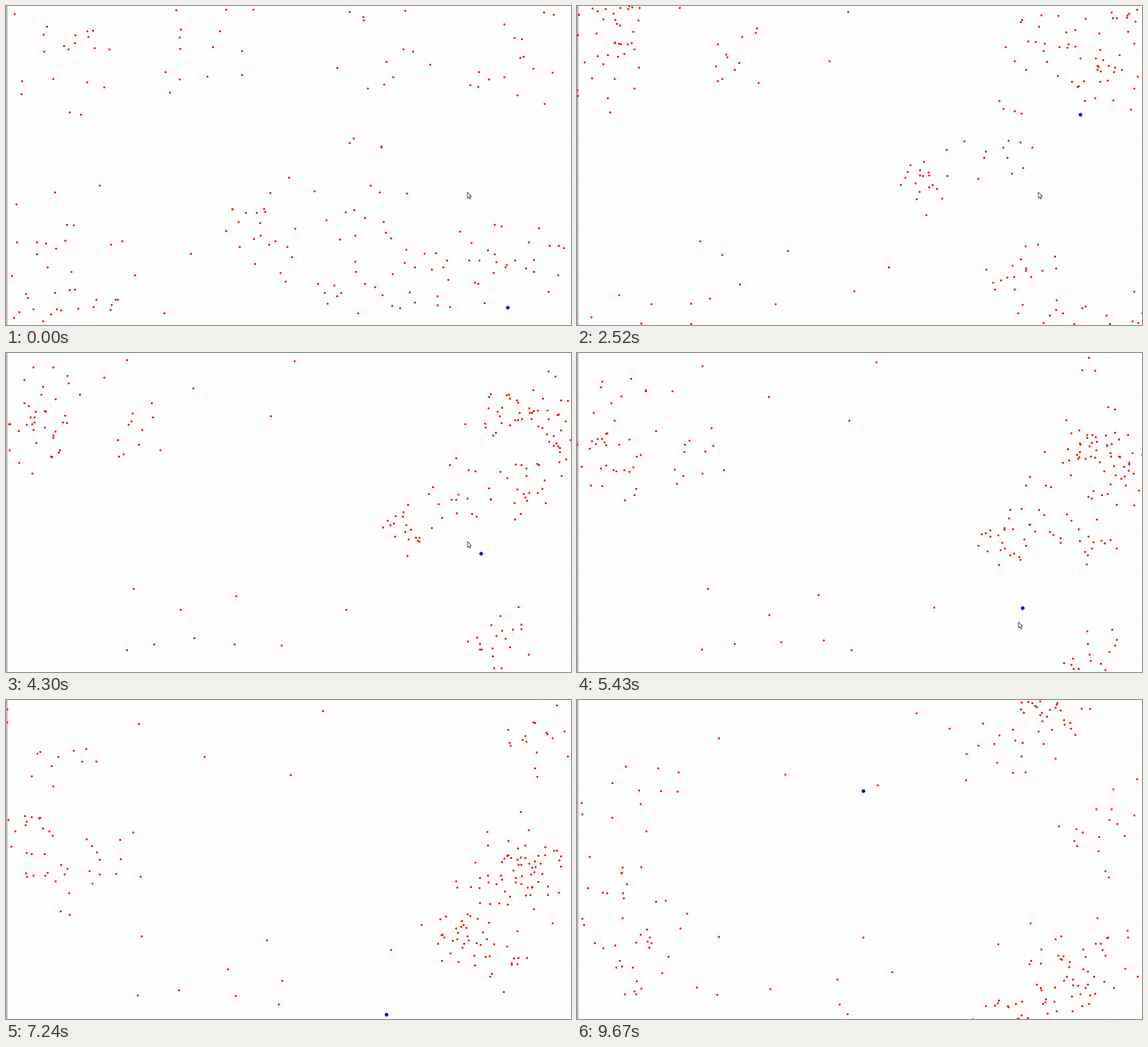
These frames come from a looping animation (997 px wide and 562 px high, 9770 ms). A matplotlib script:

```python
import numpy as np
import matplotlib.pyplot as plt
from matplotlib.animation import FuncAnimation
from matplotlib.patches import Polygon

W, H, DPI = 997, 562, 64
LOOP, FRAMES = 9770, 123
PX = 72 / DPI                     # one pixel in points
WRAP = np.array([W + 6, H + 6])   # dots hide briefly past the edges
MID = 0.45                        # loop phase of each middle point
rng = np.random.default_rng(11)


def wrap(p):
    return (p + 3) % WRAP - 3


class Flock:
    """Dots around a centre that follows a parabola through three points."""

    def __init__(self, n, start, mid, end):
        self.points = np.array([start, mid, end], float)
        self.unit = rng.normal(size=(n, 2)).clip(-1.9, 1.9)
        self.phase = rng.uniform(0, 2 * np.pi, (n, 2))

    def at(self, s):
        weights = [(s - MID) * (s - 1) / MID,
                   s * (1 - s) / (MID * (1 - MID)),
                   s * (s - MID) / (1 - MID)]
        spread = 46 - 18 * np.sin(np.pi * s)   # loose, tight, loose again
        sway = 8 * np.sin(self.phase + 10 * s)
        return wrap(weights @ self.points + self.unit * spread + sway)


class Strays:
    """Single dots drifting slowly, each with its own velocity."""

    def __init__(self, n):
        self.p = rng.uniform((150, 400), (600, 700), (n, 2))
        self.v = rng.normal((140, 50), 100, (n, 2))

    def at(self, s):
        return wrap(self.p + self.v * s)


# centres run on past the edges and are wrapped when drawn
swarm = [
    Flock(16, (838, 465), (905, 830), (790, 1172)),
    Flock(16, (885, 90), (950, 175), (840, 505)),
    Flock(13, (955, 445), (950, 695), (880, 1030)),
    Flock(13, (745, 510), (880, 680), (850, 1085)),
    Flock(9, (675, 100), (870, 115), (830, 525)),
    Flock(8, (75, 520), (-42, 650), (-70, 1040)),
    Flock(20, (615, 495), (865, 510), (930, 800)),
    Flock(20, (430, 390), (695, 310), (820, 592)),
    Flock(15, (630, 325), (800, 245), (740, 625)),
    Flock(11, (350, 80), (240, 140), (160, 450)),
    Flock(18, (115, 120), (35, 160), (60, 385)),
    Flock(13, (90, 410), (90, 700), (95, 1005)),
    Flock(9, (75, 520), (65, 610), (110, 705)),
    Strays(14),
]

# key frames of the blue leader, which also crosses the lower edge
LEAD_K = (0, 19, 31, 54, 68, 91, 121, 122)
LEAD_X = (885, 927.5, 887.5, 837.5, 785.5, 671, 505, 500)
LEAD_Y = (531, 669, 758.5, 921, 1017, 1122, 1296, 1302)

fig = plt.figure(figsize=(W / DPI, H / DPI), dpi=DPI, facecolor="#fefefe")
ax = fig.add_axes([0, 0, 1, 1])
ax.set(xlim=(0, W), ylim=(H, 0))
ax.axis("off")

GRID, STEP = "#f8f8fa", 78.45
for i in range(1, 13):
    ax.axvline(0.9 + i * STEP, color=GRID, lw=PX, zorder=0)
for i in range(7):
    ax.axhline(76.5 + i * STEP, color=GRID, lw=PX, zorder=0)
ax.axvline(0.5, color="#5c5c66", lw=PX)
ax.axvline(W - 0.5, color="#a8a8b0", lw=PX)
ax.axhline(H - 0.5, color="#8c8c8c", lw=PX)

dots, = ax.plot([], [], "o", color="#ff0000", ms=3.6 * PX, mew=0, zorder=3)
lead, = ax.plot([], [], "o", color="#0000ff", ms=6.4 * PX, mew=0, zorder=4)

ARROW = np.array([(0, 0), (0, 10.5), (2.4, 8.3), (4.2, 12),
                  (5.8, 11.2), (4.2, 7.8), (7.3, 7.5)])
mouse = Polygon(ARROW, closed=True, fc="white", ec="#222222",
                lw=0.9 * PX, zorder=5)
ax.add_patch(mouse)


def update(k):
    p = np.concatenate([group.at(k / (FRAMES - 2)) for group in swarm])
    dots.set_data(p[:, 0], p[:, 1])
    x, y = wrap(np.array([np.interp(k, LEAD_K, LEAD_X),
                          np.interp(k, LEAD_K, LEAD_Y)]))
    lead.set_data([x], [y])
    # the pointer rests, then leaves through the lower edge
    tip = [np.interp(k, (58, 68, 80), (814, 779, 745)),
           np.interp(k, (44, 52, 58, 68, 80), (328, 332, 332, 474, 580))]
    mouse.set_xy(ARROW + tip)
    return dots, lead, mouse


anim = FuncAnimation(fig, update, frames=FRAMES, interval=LOOP / FRAMES,
                     repeat=True, repeat_delay=0, blit=False)
plt.show()
```
